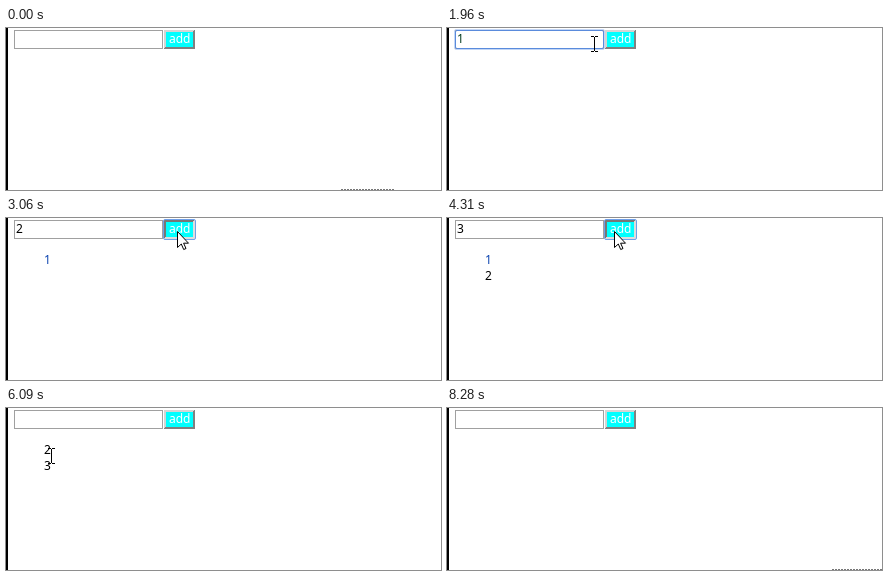
Recreate the animation shown at these times as an HTML page with a canvas. Size 435 by 162 pixels, loop 8.43 s.

```html
<!DOCTYPE html>
<html lang="en">
<head>
<meta charset="utf-8">
<title>Add and remove list items</title>
<style>
html, body { margin: 0; width: 100%; height: 100%; overflow: hidden; background: #fff; }
canvas { display: block; }
</style>
</head>
<body>
<canvas id="stage" width="435" height="162"></canvas>
<script>
const ctx = document.getElementById('stage').getContext('2d', { alpha: false });
const LOOP = 8430;
const STEP = 77; // the pointer advances in discrete steps
const ENTER = 110, EXIT = 7960;
const ROW = 16;
const EDGE = { x: 326, y: 141 };
const ITEM = { x: 45, y: 48 };

// Each entry is typed into the field, added with the button and removed by a click
const entries = [
  { text: '1', focus: 640, typed: 1430, press: 2050, release: 2120, removed: 6010,
    field: { x: 78, y: 15 }, button: { x: 164, y: 16 }, ink: '#043c20', color: '#0c44b0' },
  { text: '2', focus: 2440, typed: 2670, press: 2980, release: 3130, removed: 6410,
    field: { x: 138, y: 9 }, button: { x: 171, y: 13 }, ink: '#000', color: '#000' },
  { text: '3', focus: 3440, typed: 3670, press: 4310, release: 4390, removed: 7190,
    field: { x: 138, y: 9 }, button: { x: 167, y: 13 }, ink: '#000', color: '#000' }
];

const moves = [];
const moveTo = (start, end, point) => moves.push({ start, end, point });

let idleSince = ENTER;
for (const e of entries) {
  moveTo(idleSince, e.focus - STEP, e.field);
  moveTo(e.typed + 2 * STEP, e.press - STEP, e.button);
  idleSince = e.release;
}
moveTo(idleSince, 5150, { x: 63, y: 53 });
moveTo(5150, 5470, { x: 45, y: 41 });
moveTo(5640, 5940, ITEM);
moveTo(6650, 6730, { x: 46, y: 50 });
moveTo(6960, 7040, ITEM);
moveTo(7190, EXIT, EDGE);

function pointerAt(t) {
  let { x, y } = EDGE;
  for (const { start, end, point } of moves) {
    if (t < start) break;
    const steps = Math.max(1, Math.round((end - start) / STEP));
    const k = Math.min(1, Math.floor((t - start) / (end - start) * steps) / steps);
    x += (point.x - x) * k;
    y += (point.y - y) * k;
  }
  return [Math.round(x), Math.round(y)];
}

function rect(color, x, y, w, h) {
  ctx.fillStyle = color;
  ctx.fillRect(x, y, w, h);
}

function label(text, x, y, color) {
  ctx.font = '500 12px "Noto Sans", "Open Sans", sans-serif';
  ctx.fillStyle = color;
  ctx.fillText(text, x, y);
}

function ring(color, x, y, w, h) {
  ctx.strokeStyle = color;
  ctx.lineWidth = 1;
  ctx.beginPath();
  ctx.roundRect(x + 0.5, y + 0.5, w - 1, h - 1, 1.5);
  ctx.stroke();
}

function drawInput(t) {
  const current = entries.findLast(e => t >= e.focus);
  const focused = current && t < current.press;
  const typed = current && t >= current.typed && t < current.release;

  rect('#a0a0a0', 8, 2, 149, 19);
  rect('#fff', 9, 3, 147, 17);
  if (focused) {
    ring('#c3d6f6', 7, 1, 151, 21);
    ring('#5a8bdc', 8, 2, 149, 19);
  }
  if (typed) label(current.text, 10, 15, current.ink);
  if (focused) {
    const blink = (t - (typed ? current.typed : current.focus)) % 1000;
    if (blink < 500) rect('#000', typed ? 17 : 10, 4, 1, 14);
  }
}

function drawButton(t) {
  const last = entries.findLastIndex(e => t >= e.press);
  const pressed = last >= 0 && t < entries[last].release;
  const blur = entries[last + 1]?.focus ?? entries[0].removed;
  const [light, dark] = pressed ? ['#777', '#ddd'] : ['#d4d4d4', '#808080'];

  rect(dark, 158, 2, 31, 19);
  rect(light, 158, 2, 30, 1);
  rect(light, 158, 2, 1, 18);
  rect(light, 159, 3, 28, 1);
  rect(light, 159, 3, 1, 16);
  rect('#0ff', 160, 4, 27, 15);
  label('add', 163, 15, '#fff');
  if (last >= 0 && t < blur) ring('#6f9fe8', 157, 1, 33, 21);
}

function drawArrow(x, y) {
  const shape = new Path2D('M.5.5V16.5L4.3 13 6.7 18.5 9 17.5 6.6 12.2H11.5Z');
  ctx.save();
  ctx.translate(x, y);
  ctx.fillStyle = '#fff';
  ctx.strokeStyle = '#000';
  ctx.fill(shape);
  ctx.stroke(shape);
  ctx.restore();
}

function drawBeam(x, y) {
  for (const edge of [y - 8, y + 7]) {
    rect('#000', x - 3, edge, 3, 1);
    rect('#000', x + 1, edge, 3, 1);
  }
  rect('#000', x, y - 7, 1, 14);
}

function drawPointer(t, itemCount) {
  const typing = entries.some(e => t >= e.typed && t < e.typed + 2 * STEP);
  if (typing || t < ENTER || t >= EXIT) return;
  const [x, y] = pointerAt(t);
  const overInput = x >= 8 && x < 162 && y >= 2 && y < 21;
  const overItem = x >= 38 && x < 48 && y >= 34 && y < 34 + ROW * itemCount;
  (overInput || overItem ? drawBeam : drawArrow)(x, y);
}

function dashes(from, to) {
  for (let x = from; x < to; x += 3) rect('#777', x, 161, 2, 1);
}

function draw(t) {
  rect('#fff', 0, 0, 435, 162);
  rect('#000', 0, 0, 2, 162);
  drawInput(t);
  drawButton(t);

  const items = entries.filter(e => t >= e.release && t < e.removed);
  items.forEach((e, i) => label(e.text, 38, 46 + ROW * i, e.color));

  if (t < ENTER) dashes(335, 388);
  if (t >= 8280) dashes(385, 435);
  drawPointer(t, items.length);
}

function frame() {
  draw(performance.now() % LOOP);
  requestAnimationFrame(frame);
}
frame();
</script>
</body>
</html>
```
